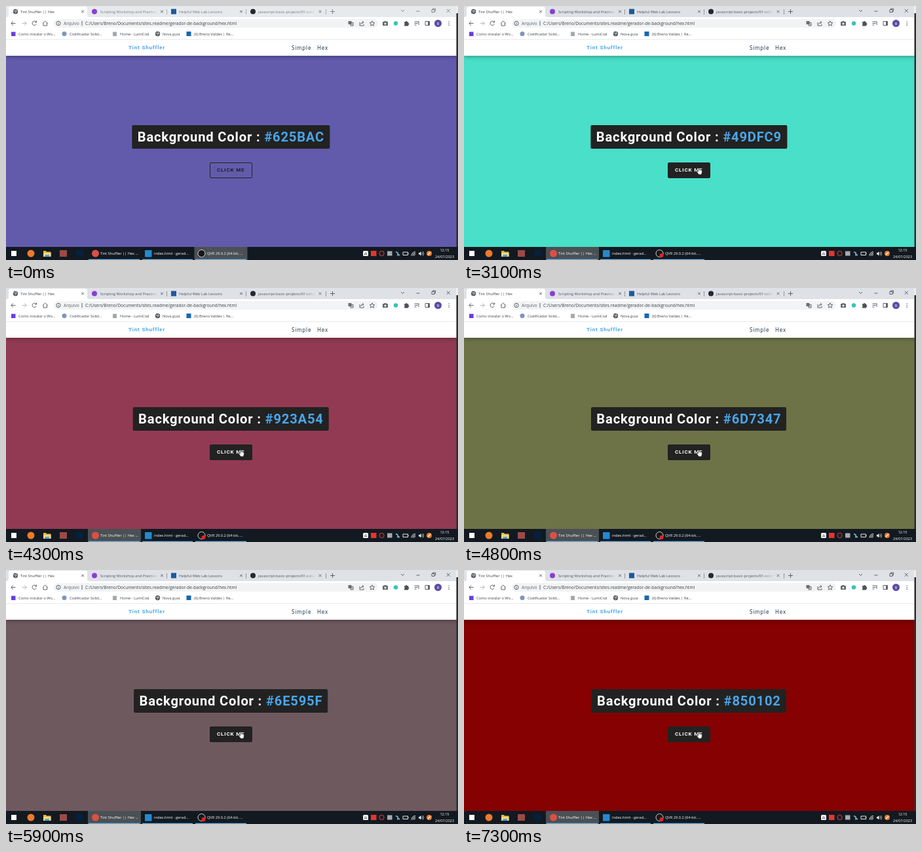
Write an HTML page that moves like this. It is 690 by 388 pixels and loops after 8000 ms.

```html
<!DOCTYPE html>
<html lang="pt-BR">
<head>
<meta charset="utf-8">
<title>Tint Shuffler</title>
<style>
html, body { margin: 0; width: 100%; height: 100%; overflow: hidden; background: #fff; }
#stage { position: absolute; left: 0; top: 0; width: 690px; height: 388px; overflow: hidden; --bg: #625bac; --strip: #e7eaed; --ink: #70757a; }
#page { position: absolute; left: 0; top: 52px; width: 687.5px; height: 316px; background: var(--bg); overflow: hidden; }
nav { height: 24px; background: #fff; box-shadow: 0 2px 6px rgba(0,0,0,.3); }
nav span { position: absolute; top: 0; font: 8.06px/24px "Open Sans", sans-serif; letter-spacing: .81px; color: #102a42; white-space: nowrap; }
nav .brand { left: 187px; font: 700 8.06px/24px Roboto, sans-serif; color: #49a6e9; }
h2 { position: absolute; left: 343.4px; top: 130px; height: 36px; margin: 0; padding: 0 8px; transform: translateX(-50%); border-radius: 2px; background: #222; color: #fff; font: 700 20.16px/36px Roboto, sans-serif; letter-spacing: .81px; white-space: nowrap; }
h2 span { color: #49a6e9; }
#button { position: absolute; left: 311px; top: 186.5px; width: 65px; height: 24px; box-sizing: border-box; border: 1px solid #222; border-radius: 2px; padding-left: 10px; font: 700 8.06px/22px Roboto, sans-serif; letter-spacing: .81px; white-space: nowrap; }
svg { position: absolute; left: 0; top: 0; }
text { font: 5.7px "Open Sans", sans-serif; fill: #3c4043; }
.tabs text { fill: var(--ink); }
.url text { font-size: 6.6px; }
.bar text { fill: #fff; }
.line { fill: none; stroke: #5f6368; stroke-width: 1; }
.tabs .line { stroke: var(--ink); stroke-width: .9; }
.tile { fill: #fff; opacity: 0; }
</style>
</head>
<body>
<div id="stage">
  <div id="page">
    <nav><span class="brand">Tint Shuffler</span><span style="left:436px">Simple</span><span style="left:475px">Hex</span></nav>
    <h2>Background Color : <span id="hex">#625BAC</span></h2>
    <div id="button">CLICK ME</div>
  </div>
  <svg width="690" height="388" viewBox="0 0 690 388">
    <defs>
      <linearGradient id="fade"><stop offset=".85" stop-color="#fff"/><stop offset="1" stop-color="#fff" stop-opacity="0"/></linearGradient>
      <mask id="cut" maskUnits="userSpaceOnUse" x="0" y="0" width="690" height="18">
        <path d="M140 0h92v18h-92z" fill="url(#fade)"/><path d="M381 0h91v18h-91z" fill="url(#fade)"/>
      </mask>
      <g id="globe"><circle r="3.7" fill="#505458"/><path d="M-2.8-1.2L0-.6 .6 1-1 2.6M1-2.8L.6-1.4 2.8 0" fill="none" stroke="#fff" stroke-width=".8"/></g>
      <path id="x" class="line" d="M-1.8-1.8L1.8 1.8M1.8-1.8L-1.8 1.8"/>
    </defs>

    <g class="tabs">
      <path d="M0 0h687.5v17H0z" style="fill:var(--strip)"/>
      <path d="M1 17q3 0 3-3V4q0-3 3-3h114q3 0 3 3v10q0 3 3 3z" fill="#fff"/>
      <use href="#globe" x="14.5" y="8.5"/>
      <text x="22" y="10.6" style="fill:#3c4043">Tint Shuffler || Hex</text>
      <circle cx="135" cy="8.5" r="4" fill="#8a3ed0"/>
      <g mask="url(#cut)">
        <text x="144" y="10.6">Scripting Workshop and Practice G</text>
        <text x="385" y="10.6">javascript-basic-projects/01-color</text>
      </g>
      <path d="M252 4.5h8v8h-8z" fill="#1d5a9c"/>
      <text x="264" y="10.6">Helpful Web Lab Lessons</text>
      <circle cx="377" cy="8.5" r="4" fill="#24292f"/>
      <use href="#x" x="117" y="8.5"/><use href="#x" x="238" y="8.5"/><use href="#x" x="359" y="8.5"/><use href="#x" x="479.500" y="8.5"/>
      <path class="line" d="M245.500 5v8M366.500 5v8M488.500 5v8" opacity=".6"/>
      <path class="line" d="M495 8.500h7M498.500 5v7M603 6l2.500 2.500L608 6M626.500 8h5M650 5.500h4v4h-4zM651.500 5.500V4H655.500v4H654M672.800 4.800l5 5M677.800 4.800l-5 5"/>
    </g>

    <path d="M0 17h687.5v35H0z" fill="#fff"/>
    <g class="url">
      <rect x="73" y="20" width="495" height="13" rx="6.5" fill="#f1f3f4"/>
      <path class="line" d="M14.500 26.500H8M11 23.300L7.800 26.500l3.200 3.200M46 24.500a3.200 3.200 0 1 0 .3 3M46.500 22.500v2.500H44M56 26.500l3.800-3.500 3.800 3.500M57 26v4h5.500v-4"/>
      <path class="line" d="M24.500 26.500H31M28 23.300l3.200 3.200-3.200 3.200" opacity=".45"/>
      <circle class="line" cx="80" cy="26.500" r="3.2" stroke-width=".8"/>
      <path class="line" d="M80 26v2.300M80 24.500v.8M116 23v7" stroke-width=".7"/>
      <text x="88" y="28.900" fill-opacity=".8">Arquivo</text>
      <text x="121" y="28.900">C:/Users/Breno/Documents/sites.readme/gerador-de-background/hex.html</text>
      <path d="M522.500 23h5v5h-5z" fill="#6b7075"/>
      <path class="line" d="M526 25.500h4v4.500h-4zM527.500 28h1.500M540 25v5h6v-2M541.500 28q.5-3 4-3M544 23l2 2-2 2" stroke-width=".8"/>
      <path class="line" d="M559 22.800l1.100 2.500 2.700.3-2 1.800.6 2.700-2.400-1.400-2.400 1.400.6-2.700-2-1.800 2.700-.3z" stroke-width=".7"/>
      <path d="M575 24h2l1-1h2l1 1h2v6h-8z" fill="#666a6e"/><circle cx="579" cy="27" r="1.5" fill="#fff"/>
      <circle cx="595" cy="26.500" r="3.200" fill="#35c4b5"/>
      <path d="M608 24.300h2a1.200 1.200 0 0 1 2.400 0h1.800v2a1.200 1.200 0 0 1 0 2.400v1.800h-6.200v-2a1.200 1.200 0 0 0 0-2.200z" fill="#4d5156"/>
      <path class="line" d="M623.500 24h7M623.500 26.500h5M623.500 29h3M630 24v5M640 23.500h6.500v6H640z"/>
      <path d="M644 23.500h2.500v6H644z" fill="#5f6368"/>
      <circle cx="659.500" cy="26.500" r="5.500" fill="#5c4aa5"/>
      <text x="659.500" y="28.500" text-anchor="middle" style="font-size:5.5px;fill:#fff">B</text>
      <path d="M675.500 23.200h1.300v1.300h-1.300zm0 2.700h1.300v1.300h-1.300zm0 2.700h1.300v1.300h-1.300z" fill="#5f6368"/>
    </g>
    <g>
      <path d="M8 39.500h6.500v6.500H8z" fill="#673de6"/>
      <text x="19" y="44.600">Como instalar o Wo...</text>
      <circle cx="89" cy="42.500" r="3.500" fill="#8094bd"/>
      <text x="97" y="44.600">Codificador Solid...</text>
      <path d="M163 39.500h6v6.500h-6z" fill="#a4a8ab"/>
      <text x="174" y="44.600">Home - LumiCod</text>
      <use href="#globe" x="231.500" y="42.500"/>
      <text x="239" y="44.600">Nova guia</text>
      <path d="M275.500 39h7v7h-7z" fill="#1667b7"/>
      <text x="287" y="44.600">(6) Breno Valdes | Re...</text>
      <path d="M0 51.300h687.500" stroke="#dfe1e4" stroke-width=".8"/>
    </g>

    <path d="M687.500 0h2.500v11h-2.500z" fill="#eceef0"/>
    <path d="M687.500 11h2.500v357h-2.500z" fill="#2c2f33"/>

    <g class="bar">
      <path d="M0 368h690v20H0z" fill="#121920"/>
      <path id="browserTile" class="tile" d="M125 368h81v20h-81z"/>
      <path id="recorderTile" class="tile" d="M287.500 368h81v20h-81z"/>
      <path d="M126 387.300h78M208 387.300h77M289 387.300h78" stroke="#76b9ed" stroke-width="1.200"/>
      <path d="M8 374h8v8H8z" fill="#fff"/>
      <circle cx="38" cy="378" r="5.500" fill="#ee7a2b"/>
      <path d="M57 374h4l1 1.500h6.500V383H57z" fill="#e8b73c"/><path d="M57 377h11.500v5.500H57z" fill="#f8da7c"/><path d="M59.500 380h6.500v3h-6.500z" fill="#4ba3dc"/>
      <path d="M82 373h11v10H82z" fill="#9c4a48"/>
      <path d="M107 373h11v10h-11z" fill="#06213c"/>
      <circle cx="136.500" cy="378" r="5.500" fill="#dc5044"/>
      <path d="M212 373h10.500v10.500H212z" fill="#2489d0"/>
      <circle cx="298.500" cy="378" r="5.500" fill="#17181b" stroke="#e4e4e4" stroke-width=".9"/>
      <circle id="recording" cx="301.500" cy="381" r="3" fill="#ee2020"/>
      <text x="144" y="380">Tint Shuffler || Hex ...</text>
      <text x="226" y="380">index.html - gerad...</text>
      <text x="307" y="380">QVR 29.0.2 (64-bit, ...</text>
      <rect x="545" y="374" width="8" height="8" rx="1.500" fill="#f1f1f1"/>
      <path d="M547 379.500l2-3 2 3z" fill="none" stroke="#555" stroke-width=".7"/>
      <path d="M557 374h8.500v8H557z" fill="#e4352e"/>
      <circle cx="573.500" cy="378" r="3.700" fill="#27191b" stroke="#c94b4b"/>
      <path d="M582 374.500h7.500v7H582z" fill="#a5abb0"/>
      <path d="M595 375.500l3 1.500v4.500M598 379l3 2" fill="none" stroke="#7bb9cf" stroke-width="1.600"/>
      <path d="M606 376h7.500v4.500H606zM614 377.500v1.500" fill="none" stroke="#fff" stroke-width=".9"/>
      <path d="M619 381.500a6 6 0 0 1 6-6M621 381.500a4 4 0 0 1 4-4M623 381.500a2 2 0 0 1 2-2" fill="none" stroke="#fff" stroke-width=".9"/>
      <path d="M630 377h1.500l2-2v6.500l-2-2H630z" fill="#fff"/><path d="M635 376.500q1.200 1.700 0 3.500M636.500 375q2.200 3.200 0 6.500" fill="none" stroke="#fff" stroke-width=".7"/>
      <circle cx="646" cy="378" r="4" fill="#ef7a28"/><path d="M644 380l4-4" stroke="#fff" stroke-width="1.200"/>
      <g text-anchor="middle"><text x="669.500" y="375.200" style="font-size:5.500px">12:15</text><text x="669.500" y="385" style="font-size:5.500px">24/07/2023</text></g>
    </g>

    <path id="hand" d="M-1.500-4.200q1-1 1.700 0V-1.400q.9-.5 1.400.2.900-.4 1.400.3 1.300-.2 1.300 1V2.300q0 1.200-.8 2v1.200H-1.200V4.500L-3.700 1.300q-.3-1.300 1-1l1.200 1z" fill="#fff" stroke="#111" stroke-width=".6"/>
  </svg>
</div>
<script>
const LOOP = 8000, STEP = 100, HOVER = 2260, CLICK = 2800;
const colors = [
  [0, '#625BAC'], [CLICK, '#49DFC9'], [3600, '#6D8C8E'], [4200, '#923A54'], [4700, '#6D7347'],
  [5300, '#48AD3A'], [5900, '#6E595F'], [6500, '#940584'], [7200, '#850102']
];
const el = id => document.getElementById(id);
const clamp = v => Math.min(1, Math.max(0, v));
const stage = el('stage'), button = el('button'), hand = el('hand');

function draw(now) {
  const t = Math.floor(now % LOOP / STEP) * STEP;
  const color = colors.filter(([start]) => start <= t).pop()[1];
  const focused = t >= CLICK;
  stage.style.setProperty('--bg', color);
  stage.style.setProperty('--strip', focused ? '#dee1e6' : '#e7eaed');
  stage.style.setProperty('--ink', focused ? '#505458' : '#777b80');
  el('hex').textContent = color;

  const hover = clamp((t - HOVER) / 260), shade = 34 + 221 * hover;
  button.style.background = `rgba(34,34,34,${hover})`;
  button.style.color = `rgb(${shade},${shade},${shade})`;

  el('browserTile').style.opacity = focused ? .24 : 0;
  el('recorderTile').style.opacity = focused ? 0 : .24;
  el('recording').style.opacity = t >= 400 ? 1 : 0;

  const away = (1 - clamp((t - 2300) / 400)) ** 2;
  hand.style.opacity = t > 2300 ? 1 : 0;
  hand.setAttribute('transform', `translate(${359 + 14 * away} ${252 - 5 * away})`);
}

function tick() {
  draw(performance.now());
  requestAnimationFrame(tick);
}
tick();
</script>
</body>
</html>
```
